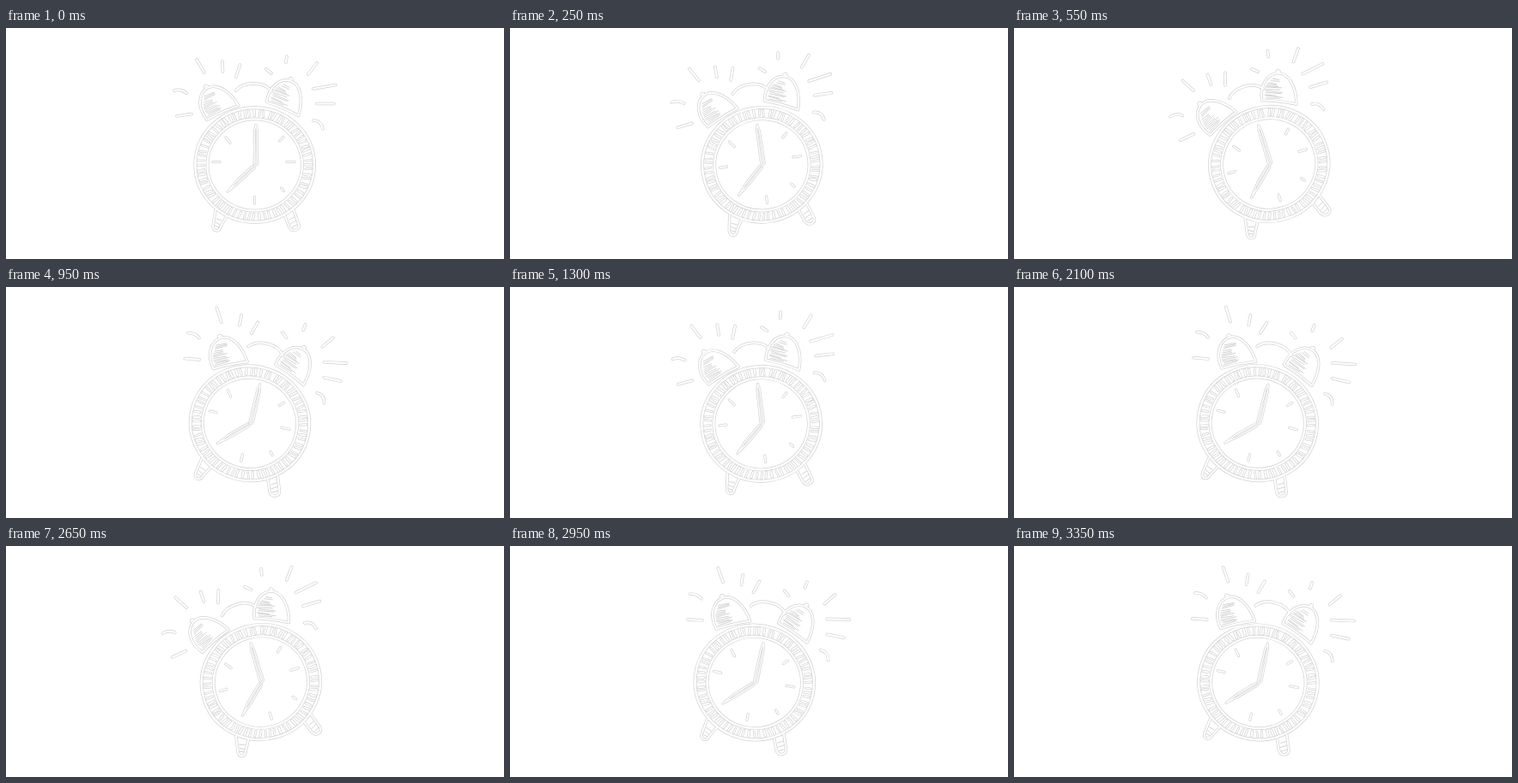
An HTML page with a canvas that plays this animation: 580 px wide and 270 px high, repeating every 5.05 s.

```html
<!DOCTYPE html>
<html lang="en">
<head>
<meta charset="utf-8">
<title>Ringing alarm clock</title>
<style>
  html, body { margin: 0; width: 100%; height: 100%; overflow: hidden; background: #fff; }
  canvas { display: block; width: 580px; height: 270px; }
</style>
</head>
<body>
<canvas id="stage"></canvas>
<script>
const LOOP = 5050, STEP = 50;
const PIVOT = { x: 290, y: 134.5 };
const INK = '#d2d2d2', PAPER = '#fff';

// Swing: time in ms, angle in degrees
const swing = [
  [0, 0], [520, -17.5], [1010, 14], [1470, -15.5], [2020, 16], [2480, -17],
  [2600, -17.5], [3000, 12.3], [3250, 12.3], [3350, 12], [LOOP, 12]
];

const canvas = document.getElementById('stage');
const ctx = canvas.getContext('2d');
const dpr = window.devicePixelRatio || 1;
canvas.width = 580 * dpr;
canvas.height = 270 * dpr;

let seed = 11;
function rand() {
  seed = (seed * 16807) % 2147483647;
  return seed / 2147483647;
}
const jitter = n => (rand() - 0.5) * 2 * n;

// Chalk strokes are white with a thin grey edge; scribbles are plain grey lines.
const chalk = [];
const scribble = new Path2D();

function stroke(width, d) {
  const path = new Path2D(d);
  chalk.push({ path, width });
  return path;
}

function ring(rx, ry, width) {
  stroke(width).ellipse(289.7, 160, rx, ry, 0, 0, Math.PI * 2);
}

function rimHatch() {
  const count = 68;
  for (let i = 0; i < count; i++) {
    const a = i / count * Math.PI * 2 + jitter(0.015);
    const b = a + jitter(0.02);
    const inner = 58.5 + rand(), outer = 65.5 + rand();
    const p = stroke(1.2 + rand());
    p.moveTo(289.7 + Math.cos(a) * inner, 160 + Math.sin(a) * inner * 0.97);
    p.lineTo(289.7 + Math.cos(b) * outer, 160 + Math.sin(b) * outer * 0.97);
  }
}

function bell(x, y, deg) {
  const m = new DOMMatrix().translate(x, y).rotate(deg);
  const dome = new Path2D('M-20 -3C-22 -21 -12 -34 0 -34C12 -34 21 -18 20 3Q0 -2 -20 -3Z');
  const knob = new Path2D('M-1 -36Q0 -38 1.5 -36');
  stroke(2, ).addPath(dome, m);
  stroke(2.4).addPath(knob, m);

  const lines = new Path2D();
  for (let i = 0; i < 12; i++) {
    const h = -6 - i * 2;
    const left = -17 + Math.pow(i / 11, 3) * 9;
    lines.moveTo(left + rand() * 2, h + jitter(0.5));
    lines.lineTo(1 + jitter(4), h + 2 + jitter(1));
  }
  scribble.addPath(lines, m);
}

// Sparks around the clock
[
  'M222 37L231 52', 'M252 39L252.500 51', 'M272.500 43L268 57',
  'M303 48L309 53', 'M327 33L326 40', 'M362 41L352 54',
  'M358 71L384 66.500', 'M362 88.500L382 88.500',
  'M358 108Q367 108 369 118', 'M196 73Q204 71 210 76', 'M199 103L216 100.500'
].forEach(d => stroke(2.2, d));

// Case
stroke(2.2, 'M268 73C277 62 301 62 309 74');
bell(252.500, 99, -33);
bell(322, 94.500, 15);
ring(69.3, 66.8, 2.5);
rimHatch();
ring(55.2, 53.6, 2.4);

// Legs
stroke(2, 'M244 213L241 231Q241 237 246 237Q249 236 250 232L257 220');
stroke(2, 'M325 220L330 233Q333 238 338 236Q342 234 341 230L335 213');
scribble.addPath(new Path2D(
  'M245 223L251 225M244 227L249 230M243 231L248 233' +
  'M330 224L336 221M331 229L338 225M333 233L339 230'));

// Face marks
[
  'M289.500 197.500L289.500 205', 'M327 156.500L336 156.500', 'M241 156.500L249 156.500',
  'M323 127.500L318.500 132', 'M256 128L261 134.500', 'M320.500 187L323.500 190.500'
].forEach(d => stroke(1.7, d));

// Hands
stroke(1.3, 'M289 158L289.500 120L291 113L292.500 120L293 158Q291 163 289 158Z');
stroke(1.3, 'M287.500 161L270 177L258 191.500L272 180L289.500 163.500');

function angleAt(t) {
  let i = 1;
  while (i < swing.length - 1 && t > swing[i][0]) i++;
  const [t0, a0] = swing[i - 1], [t1, a1] = swing[i];
  const ease = (1 - Math.cos((t - t0) / (t1 - t0) * Math.PI)) / 2;
  return a0 + (a1 - a0) * ease;
}

function pass(color, edge) {
  ctx.strokeStyle = color;
  for (const s of chalk) {
    ctx.lineWidth = s.width + edge;
    ctx.stroke(s.path);
  }
}

function draw(t) {
  ctx.setTransform(dpr, 0, 0, dpr, 0, 0);
  ctx.fillStyle = PAPER;
  ctx.fillRect(0, 0, 580, 270);
  ctx.translate(PIVOT.x, PIVOT.y);
  ctx.rotate(angleAt(t) * Math.PI / 180);
  ctx.translate(-PIVOT.x, -PIVOT.y);
  ctx.lineCap = ctx.lineJoin = 'round';
  pass(INK, 1.4);
  pass(PAPER, 0);
  ctx.strokeStyle = INK;
  ctx.lineWidth = 0.9;
  ctx.stroke(scribble);
}

const start = performance.now();
function tick() {
  const t = (performance.now() - start) % LOOP;
  draw(Math.floor(t / STEP) * STEP);
  requestAnimationFrame(tick);
}
tick();
</script>
</body>
</html>
```
